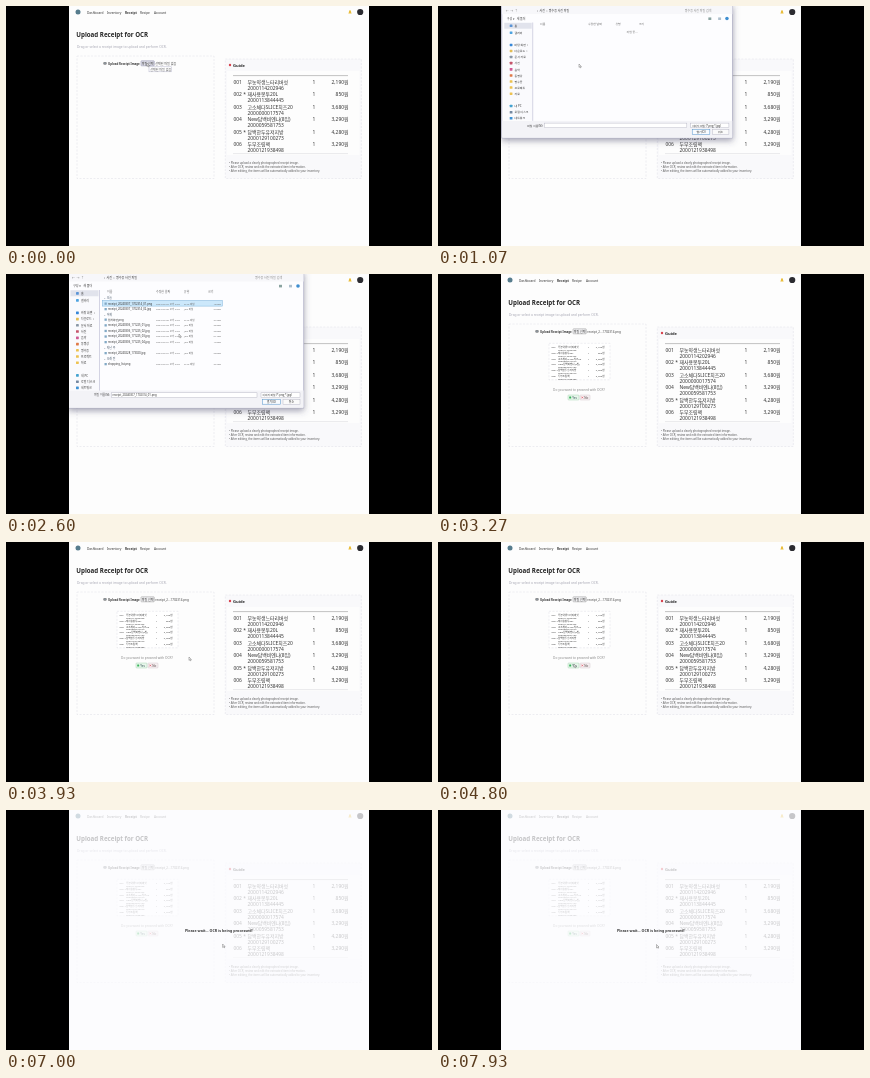
Write an HTML page that moves like this. It is 426 px wide and 240 px high and loops after 8000 ms.

```html
<!DOCTYPE html>
<html lang="ko">
<head>
<meta charset="utf-8">
<title>Receipt upload</title>
<style>
html, body { margin: 0; width: 100%; height: 100%; overflow: hidden; background: #000; }
svg { display: block; width: 100vw; height: 100vh; }
text { font-family: "Noto Sans", "Noto Sans CJK KR", "Noto Sans CJK", sans-serif; white-space: pre; }
</style>
</head>
<body>
<svg viewBox="0 0 426 240" xmlns="http://www.w3.org/2000/svg">
  <defs>
    <clipPath id="screen"><rect x="63" width="300" height="240"/></clipPath>
    <filter id="shadow" x="-10%" y="-10%" width="120%" height="130%">
      <feDropShadow dx="0" dy="2.5" stdDeviation="3" flood-color="#446" flood-opacity=".5"/>
    </filter>
  </defs>
  <rect width="426" height="240"/>
  <g clip-path="url(#screen)">
    <g id="page"></g>
    <g id="empty"></g>
    <g id="preview"></g>
    <g id="wait"></g>
    <g id="dialog"></g>
    <path id="cursor" d="M0 0V3.4L.8 2.7L1.4 3.8L2 3.6L1.5 2.5H2.4Z" fill="#fff" stroke="#555" stroke-width=".4"/>
  </g>
</svg>
<script>
const $ = id => document.getElementById(id);
const text = (x, y, s, size = 3.4, fill = '#333', extra = '') =>
  `<text x="${x}" y="${y}" font-size="${size}" fill="${fill}" ${extra}>${s}</text>`;
const rect = (x, y, w, h, fill, extra = '') =>
  `<rect x="${x}" y="${y}" width="${w}" height="${h}" fill="${fill}" ${extra}/>`;
const dot = (x, y, r, fill) => `<circle cx="${x}" cy="${y}" r="${r}" fill="${fill}"/>`;
const line = (x1, y, x2, color, width = .5) =>
  `<path d="M${x1} ${y}H${x2}" stroke="${color}" stroke-width="${width}"/>`;
const bold = 'font-weight="700"', semi = 'font-weight="600"', medium = 'font-weight="500"';
const mid = 'text-anchor="middle"', end = 'text-anchor="end"';
const dashed = 'stroke="#dcdce4" stroke-width=".5" stroke-dasharray="2 1.5"';

const items = [
  ['001', '무농약생느타리버섯', '2000114202946', '2,190원'],
  ['002 *', '재사용봉투20L', '2000113844445', '850원'],
  ['003', '고소체다SLICE치즈20', '2000000017574', '3,680원'],
  ['004', 'New담백비엔나(8입)', '2000059581753', '3,290원'],
  ['005 *', '담백한두유저지방', '2000129100273', '4,280원'],
  ['006', '두부조림팩', '2000121938498', '3,290원']
];

// The same receipt is drawn large in the guide and small in the preview.
const receipt = (x, y, pitch, size, width, drop) => items.map(([no, name, code, price], i) => {
  const row = y + i * pitch, k = width / 115;
  const cell = (dx, dy, s, extra = '') => text(x + dx * k, row + dy, s, size, '#333', `${medium} ${extra}`);
  return cell(0, 0, no) + cell(14, 0, name) + cell(14, drop, code) + cell(79, 0, '1') + cell(115, 0, price, end);
}).join('');

const camera = rect(97.5, 56.2, 3, 2.2, '#555', 'rx=".4"') + dot(99, 57.3, .7, '#bcd');
const uploadRow = (fill, border, fileName) =>
  rect(135, 54.8, 13.3, 5, fill, `rx=".6" stroke="${border}" stroke-width=".5"`) +
  text(141.6, 58.5, '파일 선택', 3, '#333', mid) + text(149.3, 58.5, fileName, 3, '#444');

$('page').innerHTML =
  rect(63, 0, 300, 240, '#fdfdfd') +
  dot(72, 6, 2.5, '#567c8d') +
  [[81, 'Dashboard'], [101, 'Inventory'], [119, 'Receipt'], [134, 'Recipe'], [148, 'Account']]
    .map(([x, s]) => text(x, 7.6, s, 3.2, '#333', s === 'Receipt' ? bold : medium)).join('') +
  '<path d="M342.3 7.4Q343 6.8 343 5.6Q343 4.2 344 4.2T345 5.6Q345 6.8 345.7 7.4Z" fill="#e9bd3b"/>' +
  dot(354.2, 6, 3.1, '#2b2b30') +
  text(70.3, 31.2, 'Upload Receipt for OCR', 6.2, '#222', bold) +
  text(71, 42.2, 'Drag or select a receipt image to upload and perform OCR.', 3.25, '#a5a5b2') +
  rect(71, 50, 137, 122.5, 'none', dashed) + camera +
  text(102, 58.5, 'Upload Receipt Image', 2.9, '#333', semi) +
  rect(219.3, 53, 136, 119.5, '#f9f9fb', dashed) +
  dot(224, 59, 1.2, '#d8434e') + text(227, 60.7, 'Guide', 4.1, '#222', bold) +
  rect(221, 65, 132.5, 84, '#fdfdfd') +
  line(227, 69.6, 342, '#888') + receipt(227.5, 77.6, 12.5, 4.9, 115, 6) +
  line(227, 147.6, 342, '#d4d4da') +
  ['Please upload a clearly photographed receipt image.',
   'After OCR, review and edit the extracted item information.',
   'After editing, the items will be automatically added to your inventory.']
    .map((s, i) => text(223, 157.6 + 4 * i, '• ' + s, 2.75, '#555')).join('');

$('empty').innerHTML =
  uploadRow('#dedee8', '#8b8bab', '선택된 파일 없음') +
  rect(143, 60.8, 22.5, 5, '#fff', 'stroke="#b5b5ca" stroke-width=".5"') +
  text(144.3, 64.5, '선택된 파일 없음', 3, '#555');

$('preview').innerHTML =
  uploadRow('#f0f0f2', '#999', 'receipt_2...1702314.png') +
  rect(111, 69.3, 61, 36.5, '#fff', dashed) +
  receipt(113.5, 74, 5.75, 2.5, 53, 2.85) +
  text(141, 116.5, 'Do you want to proceed with OCR?', 3.2, '#888', mid) +
  rect(130, 121, 11, 5, '#e9f7ec', 'rx=".8" stroke="#95caa3" stroke-width=".4"') +
  rect(131.2, 122.5, 2, 2, '#39b45c', 'rx=".3"') + text(134.2, 124.7, 'Yes', 3, '#355') +
  rect(142, 121, 10, 5, '#f6f0f2', 'rx=".8" stroke="#c9bcc3" stroke-width=".4"') +
  '<path d="M143.4 122.6l1.8 1.8m0-1.8l-1.8 1.8" stroke="#dc4654" stroke-width=".6"/>' +
  text(146.2, 124.7, 'No', 3, '#544');

$('wait').innerHTML =
  rect(63, 0, 300, 240, '#fdfdff', 'opacity=".74"') +
  text(212.7, 122.4, 'Please wait... OCR is being processed!', 3.65, '#333', `${semi} ${mid}`);

const places = [
  [19.5, '홈', '#5b94d6'], [26.5, '갤러리', '#4da3e0'], [39, '바탕 화면  ›', '#3687d8'],
  [45.2, '다운로드  ›', '#e3bd55'], [51.4, '문서 자료', '#8a97a5'], [57.6, '사진', '#c5546b'],
  [64, '음악', '#d05a94'], [70.2, '동영상', '#e07a48'], [76.4, '영수증', '#edc250'],
  [82.6, '프로젝트', '#edc250'], [88.8, '자료', '#edc250'],
  [101.5, '내 PC', '#44a2d0'], [107.8, '로컬 디스크', '#7588a0'], [114, '네트워크', '#3f92d4']
];
const groups = [[24, '오늘'], [41, '어제'], [74, '지난 주'], [85.2, '오래 전']];
const files = [
  [30.5, 'receipt_20240307_1702314_01.png'], [36, 'receipt_20240307_1702314_02.jpg'],
  [46.5, '캡처화면.png'], [52.2, 'receipt_20240306_171225_01.jpg'],
  [57.8, 'receipt_20240306_171225_02.jpg'], [63.4, 'receipt_20240306_171225_03.jpg'],
  [69, 'receipt_20240306_171225_04.jpg'], [80, 'receipt_20240228_173020.jpg'],
  [91, 'shopping_list.png']
];

$('dialog').innerHTML =
  rect(62, -3, 235.8, 137, '#fdfdff', 'stroke="#9a9ab5" stroke-width=".6" filter="url(#shadow)"') +
  rect(62, -3, 235.5, 10.5, '#f7f7fa') +
  text(66, 4.8, '←  →  ↑', 3, '#777') + text(98, 4.8, '›  사진  ›  영수증 사진 파일', 3) +
  text(249, 4.8, '영수증 사진 파일 검색', 3, '#888') +
  text(67, 13.3, '구성 ▾   새 폴더', 3) +
  rect(273, 10.8, 3, 2.6, '#8aa3a0') + rect(283, 10.8, 3, 2.6, '#aebfcd') + dot(292, 12, 1.8, '#3e8ed0') +
  rect(64, 16, 29, 100, '#fafafd') +
  rect(64.5, 16.3, 28, 6, '#e1e3ec') +
  places.map(([y, s, color]) => rect(70, y - 1.4, 2.8, 2.6, color, 'rx=".4"') + text(75, y + 1.1, s, 2.9)).join('') +
  '<path d="M93.5 16V117" stroke="#c8c8dc" stroke-width=".8"/>' +
  [[101, '이름'], [150, '수정한 날짜'], [178, '유형'], [202, '크기']]
    .map(([x, s]) => text(x, 18.7, s, 2.9, '#666')).join('') +
  text(195, 26.5, '작업 중...', 2.9, '#777', `id="loading" ${mid}`) +
  '<g id="files">' +
  rect(96.3, 26.5, 120, 5.6, '#cce8fb', 'id="selected" stroke="#7cb2da" stroke-width=".5"') +
  groups.map(([y, s]) => text(97.5, y + .7, '⌄ ' + s, 2.9, '#456')).join('') +
  files.map(([y, s], i) => rect(98.5, y - 2, 2.3, 2.3, '#82a9c5') + text(102, y, s, 2.7) +
    text(150, y, `2024-03-0${7 - Math.min(i, 6)} 오후 5:02`, 2.5, '#666') +
    text(178, y, /png$/.test(s) ? 'PNG 파일' : 'JPG 파일', 2.5, '#666') +
    text(215, y, `${182 + i * 67 % 391}KB`, 2.5, '#666', end)).join('') +
  '</g>' +
  rect(62.3, 116.5, 235.2, 17.2, '#f3f3f7') +
  text(104, 122.3, '파일 이름(N):', 2.9, '#444', end) +
  rect(105.5, 118.8, 145.5, 4.7, '#fff', 'stroke="#aaaabb" stroke-width=".4"') +
  text(106.5, 122.3, files[0][1], 2.7, '#333', 'id="chosen"') +
  rect(255, 118.8, 39, 4.7, '#fff', 'stroke="#aaaabb" stroke-width=".4"') +
  text(256.5, 122.3, '이미지 파일 (*.png;*.jpg)', 2.7) +
  rect(256.5, 125.5, 18, 4.7, '#f8fbfe', 'stroke="#4e91ca" stroke-width=".5"') + text(265.5, 129, '열기(O)', 2.9, '#333', mid) +
  rect(277, 125.5, 17, 4.7, '#fafafa', 'stroke="#aaaabb" stroke-width=".4"') + text(285.5, 129, '취소', 2.9, '#333', mid);

const OPEN = 1000, LISTED = 1350, SELECTED = 2050, CLOSED = 3200, PROCESSING = 5200, LOOP = 8000;
const path = [
  [0, 141, 57], [1070, 141, 58], [1450, 141, 58], [1950, 137, 29], [2200, 137, 29],
  [2600, 173, 60], [3000, 263, 127], [3250, 263, 127], [3930, 183, 115], [4250, 176, 117],
  [4750, 136, 122], [5250, 136, 122], [6000, 214.5, 133.5], [7900, 218.5, 134.5], [8000, 218.5, 134.5]
];
const ease = p => p * p * (3 - 2 * p);

function cursorAt(t) {
  const i = path.findIndex(p => p[0] > t);
  const [t0, x0, y0] = path[i - 1], [t1, x1, y1] = path[i];
  const p = ease((t - t0) / (t1 - t0));
  return [x0 + (x1 - x0) * p, y0 + (y1 - y0) * p];
}

const show = (id, on) => $(id).style.display = on ? '' : 'none';

function draw(now) {
  const t = now % LOOP;
  show('empty', t < CLOSED);
  show('preview', t >= CLOSED);
  show('wait', t >= PROCESSING);
  show('dialog', t >= OPEN && t < CLOSED);
  show('loading', t < LISTED);
  show('files', t >= LISTED);
  show('selected', t >= SELECTED);
  show('chosen', t >= SELECTED);
  const left = 1 - Math.min(1, Math.max(0, (t - OPEN) / 200));
  const scale = 1 - .08 * left ** 3;
  $('dialog').setAttribute('transform', `translate(150 40) scale(${scale}) translate(-150 -40)`);
  $('cursor').setAttribute('transform', `translate(${cursorAt(t)})`);
  requestAnimationFrame(draw);
}
draw(performance.now());
</script>
</body>
</html>
```
